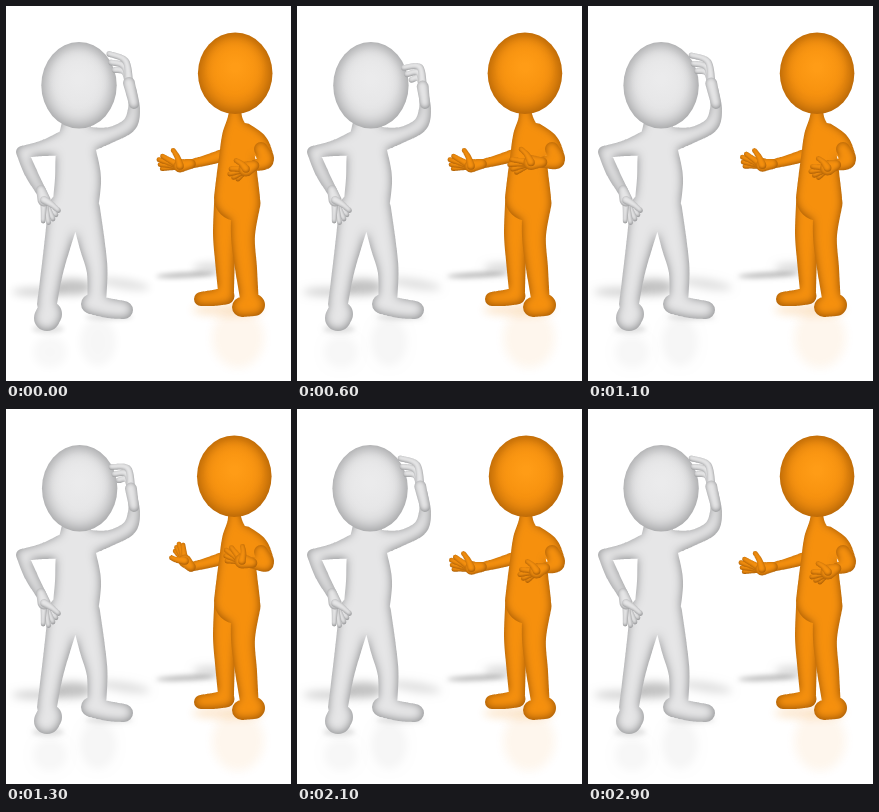
These frames come from a looping animation (285x375 px, 3000 ms). An HTML page with a canvas:

```html
<!DOCTYPE html>
<html lang="en">
<head>
<meta charset="utf-8">
<style>
html, body { margin: 0; width: 100%; height: 100%; overflow: hidden; background: #fff; }
canvas { display: block; width: 285px; height: 375px; }
</style>
</head>
<body>
<canvas id="stage" width="285" height="375"></canvas>
<script>
const W = 285, H = 375, LOOP = 3000, STEP = 100, BEAT = 1000, FAR = 2000;
const { PI, cos, sin, abs, min, max, floor } = Math;
const stage = document.getElementById('stage').getContext('2d');
const layerCanvas = Object.assign(document.createElement('canvas'), { width: W, height: H });
const layer = layerCanvas.getContext('2d');

const GREY = { edge: '#858688', base: '#e6e6e7', light: '#ebebec' };
const ORANGE = { edge: '#934e02', base: '#f6900d', light: '#ff9c16' };

const mix = (a, b, k) => a + (b - a) * k;
const polar = ([x, y], angle, r) => [x + r * cos(angle), y + r * sin(angle)];
const wave = t => cos(t / BEAT * 2 * PI);

// Smooth rise and fall around a moment of the beat, both as fractions of it.
function pulse(t, centre, width) {
  const d = abs(t / BEAT % 1 - centre);
  return cos(min(1, min(d, 1 - d) / width) * PI / 2) ** 2;
}

function spline(a, b, c, d, t) {
  return b + 0.5 * t * (c - a + t * (2 * a - 5 * b + 4 * c - d + t * (3 * (b - c) + d - a)));
}

// Adds a smooth tube through [x, y, radius] nodes to a path.
function tube(path, nodes) {
  const at = i => nodes[max(0, min(nodes.length - 1, i))];
  for (let i = 0; i < nodes.length - 1; i++) {
    for (let s = 0; s <= 24; s++) {
      const [x, y, r] = [0, 1, 2].map(j =>
        spline(at(i - 1)[j], at(i)[j], at(i + 1)[j], at(i + 2)[j], s / 24));
      path.moveTo(x + r, y);
      path.arc(x, y, max(r, 0.5), 0, 7);
    }
  }
}

// Dark silhouette with a soft lighter copy on top gives a rounded look.
function solid(path, tone, blur) {
  layer.clearRect(0, 0, W, H);
  layer.fillStyle = tone.edge;
  layer.fill(path);
  layer.save();
  layer.globalCompositeOperation = 'source-atop';
  layer.shadowColor = tone.base;
  layer.shadowBlur = blur;
  layer.shadowOffsetX = FAR - 0.4;
  layer.shadowOffsetY = -0.8;
  layer.translate(-FAR, 0);
  layer.fillStyle = '#000';
  layer.fill(path);
  layer.restore();
  stage.drawImage(layerCanvas, 0, 0);
}

function body(tone, blur, ...chains) {
  const path = new Path2D();
  chains.forEach(nodes => tube(path, nodes));
  solid(path, tone, blur);
}

function head(tone, x, y, rx, ry) {
  const path = new Path2D();
  path.ellipse(x, y, rx, ry, 0, 0, 7);
  solid(path, tone, 17);
  const glow = stage.createRadialGradient(x, y - 6, 4, x, y - 6, 31);
  glow.addColorStop(0, tone.light);
  glow.addColorStop(1, tone.light + '00');
  stage.fillStyle = glow;
  stage.fill(path);
}

function finger(tone, from, angle, length, bend, r) {
  const mid = polar(from, angle, length * 0.55);
  const tip = polar(mid, angle + bend, length * 0.45);
  body(tone, 3, [[...from, r + 1], [...mid, r], [...tip, r - 0.4]]);
}

// Four fingers fan out around an angle; the thumb turns away from it.
function hand(tone, { wrist, palm, size = 6.5, angle, length, bend = 0, spread = 0.22, thumb }) {
  for (let i = 3; i >= 0; i--) {
    finger(tone, palm, angle - (i - 1.5) * spread, length - abs(i - 1) * 2, bend, 2.8);
  }
  body(tone, 4, [[...wrist, 4.8], [...palm, size]]);
  finger(tone, palm, angle + thumb, length * 0.78, -thumb * 0.25, 2.8);
}

function haze(x, y, rx, ry, angle, color, blur) {
  stage.save();
  stage.shadowColor = color;
  stage.shadowBlur = blur;
  stage.shadowOffsetX = FAR;
  stage.fillStyle = '#000';
  stage.beginPath();
  stage.ellipse(x - FAR, y, rx, ry, angle, 0, 7);
  stage.fill();
  stage.restore();
}

function ground() {
  const shade = a => `rgba(0,0,0,${a})`, amber = a => `rgba(240,140,20,${a})`;
  haze(32, 286, 26, 4, 0, shade(0.18), 8);
  haze(66, 281, 20, 8, 0, shade(0.24), 9);
  haze(118, 278, 26, 5, 0.15, shade(0.12), 8);
  haze(180, 269, 30, 2.5, -0.05, shade(0.28), 5);
  haze(204, 262, 17, 5, 0, shade(0.14), 8);
  haze(44, 346, 17, 16, 0, shade(0.03), 8);
  haze(92, 336, 18, 24, 0, shade(0.035), 8);
  haze(42, 323, 16, 4, 0, shade(0.12), 5);
  haze(103, 311, 24, 3, 0, shade(0.12), 5);
  haze(232, 332, 26, 30, 0, amber(0.08), 10);
  haze(222, 304, 36, 6, 0, amber(0.2), 9);
}

function thinker(t) {
  const curl = (1 - wave(t)) / 2;
  body(GREY, 10,
    [[70, 122, 15], [70, 146, 20], [72, 172, 23], [70, 195, 23]],
    [[60, 137, 13], [38, 142, 8], [16, 146, 6]],
    [[16, 146, 6], [25, 167, 6.5], [36, 187, 5]],
    [[80, 134, 13], [104, 129, 8], [123, 119, 7.5], [128, 103, 6], [126, 84, 4.5]],
    [[79, 203, 15], [86, 238, 13], [91, 264, 10.5], [91, 290, 9.5]],
    [[85, 298, 10], [102, 302, 10], [118, 304, 9]],
    [[59, 203, 17], [52, 236, 13.5], [46, 266, 11], [41, 298, 10]],
    [[43, 308, 13], [41, 312, 13]]);
  hand(GREY, { wrist: [35, 184], palm: [38, 194], angle: 1.25, length: 23, spread: 0.24, thumb: -0.7 });
  head(GREY, 73 + curl, 79.3, 37.7, 43.3);

  const palm = [mix(123, 126, curl), mix(77, 81, curl)];
  for (let i = 2; i >= 0; i--) {
    finger(GREY, palm, -1.72 - i * 0.12, mix(40, 35, curl) - i * 9, mix(-1, -1.5, curl), 3.2);
  }
  body(GREY, 5, [[128, 98, 5], [...palm, 6]]);
}

function talker(t) {
  const raise = pulse(t, 0.3, 0.25), offer = pulse(t, 0.5, 0.2);
  const x = 228.5 + 0.7 * wave(t);
  const wrist = [185, 158];

  body(ORANGE, 5, [[218, 149, 6.5], [201, 154, 5.5], [...wrist, 4.5]]);
  hand(ORANGE, {
    wrist, palm: [mix(174, 179, raise), mix(160, 152, raise)],
    angle: mix(PI + 0.18, 1.5 * PI - 0.45, raise),
    length: mix(22, 18, raise), thumb: mix(1.1, -1, raise)
  });

  body(ORANGE, 8, [[222, 198, 14], [219, 228, 12], [219, 255, 10], [220, 286, 8]],
    [[220, 290, 8.5], [207, 292, 8], [195, 293, 7]]);
  body(ORANGE, 9,
    [[x, 104, 6], [229, 115, 8], [230, 131, 14], [231, 152, 18], [231, 175, 21], [231, 192, 23]],
    [[239, 127, 10], [252, 137, 10], [260, 152, 8]],
    [[240, 197, 14.5], [237, 230, 12], [240, 262, 11], [243, 290, 9.5]],
    [[248, 299, 11], [236, 301, 10]]);
  head(ORANGE, x, 67.3, 37.3, 40.8);

  const palm = [240 - 4 * raise - 12 * offer, 163 - 11 * raise - 13 * offer];
  const farWrist = [mix(palm[0], 257, 0.5), mix(palm[1], 156, 0.5)];
  body(ORANGE, 6, [[255, 143, 7], [260, 155, 7.5], [...farWrist, 5.5]]);
  hand(ORANGE, {
    wrist: farWrist, palm, size: 7.5,
    angle: PI - 0.45 + 0.9 * raise + 0.45 * offer,
    length: 17 + 2 * raise + 9 * offer,
    spread: mix(0.3, 0.2, offer), thumb: 1.3
  });
}

let start, shown;
function frame(now) {
  start ??= now;
  const t = floor((now - start) % LOOP / STEP) * STEP;
  if (t !== shown) {
    shown = t;
    stage.fillStyle = '#fff';
    stage.fillRect(0, 0, W, H);
    ground();
    thinker(t);
    talker(t);
  }
  requestAnimationFrame(frame);
}
requestAnimationFrame(frame);
</script>
</body>
</html>
```
